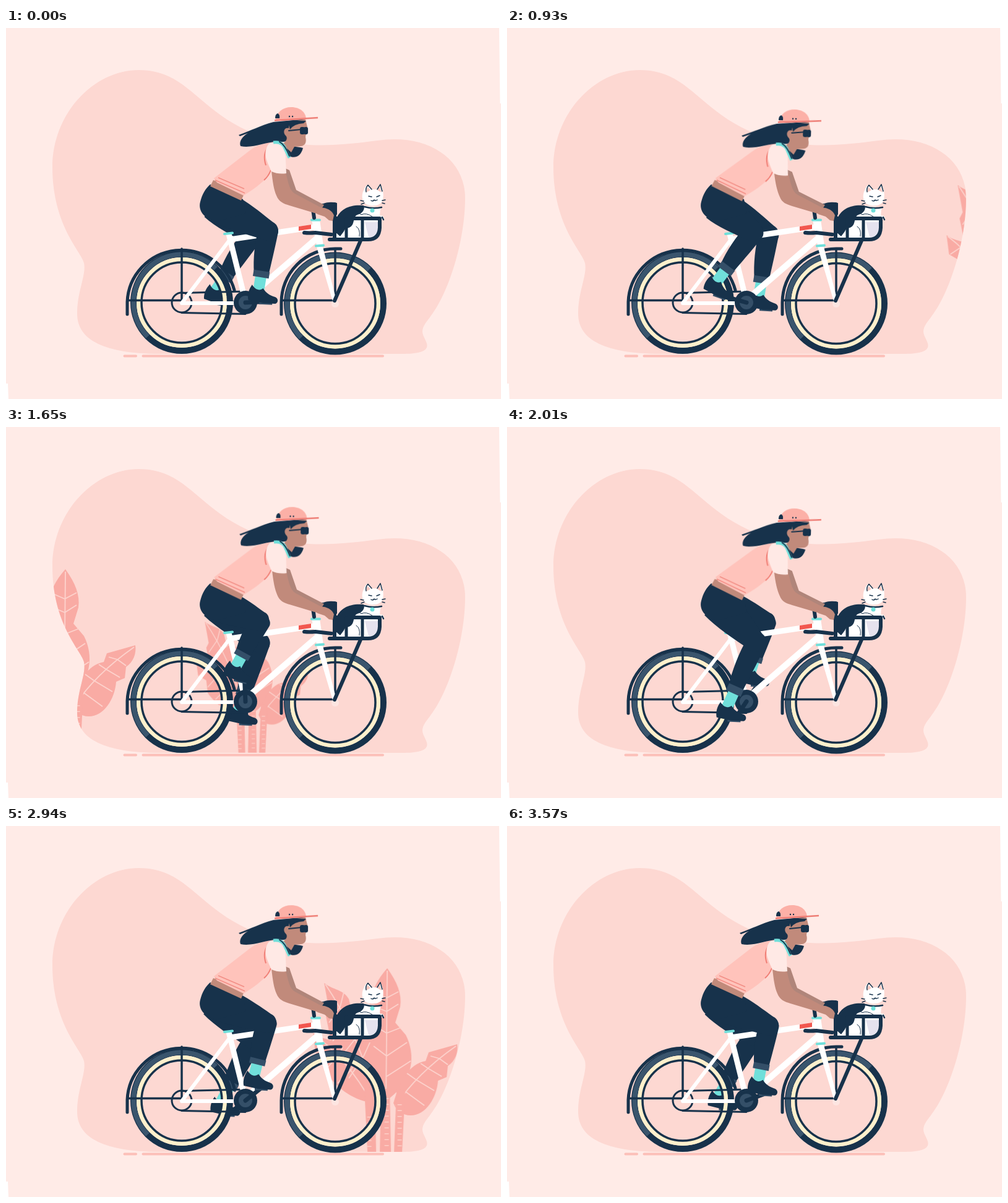
Recreate the animation shown at these times as an HTML page without scripts. Size 800 by 600 pixels, loop 3600 ms.

```html
<!DOCTYPE html>
<html lang="en">
<head>
<meta charset="utf-8">
<title>Bike ride</title>
<style>
@property --a { syntax: "<angle>"; inherits: true; initial-value: 0deg; }

html, body { margin: 0; width: 100%; height: 100%; overflow: hidden; background: #ffebe7; }
svg { display: block; width: 100vw; height: 100vh; }

.navy { fill: #17324b; }
.slate { fill: #344f68; }
.white { fill: #fff; }
.teal { fill: #70dfda; }
.skin { fill: #c18a7b; }
.shade { fill: #b0857a; }
.cap { fill: #fcb0a7; }
.line { fill: none; stroke: #17324b; stroke-linecap: round; stroke-linejoin: round; }
.tube { fill: none; stroke: #fff; }

/* Plants cross the scene in 900 ms, then wait off stage */
.plant { animation: pass 3600ms linear infinite; }
@keyframes pass {
  from { transform: translateX(520px); }
  25%, to { transform: translateX(-398px); }
}
.leaf { fill: #f9aba4; }
.vein { fill: none; stroke: #fdd3cd; stroke-width: 1.8; }

/* Legs: knee and ankle circle with the pedal, the limbs span between the joints */
.pedal { animation: pedal 600ms linear infinite; }
.far { animation-delay: -300ms; }
@keyframes pedal { from { --a: -3deg; } to { --a: 357deg; } }
.leg {
  --tilt: calc(3 + 25 * pow(max(0, cos(var(--a) - 225deg)), 3));
  --knee-x: calc(411 + 13 * cos(var(--a) + 5deg));
  --knee-y: calc(332 + 18 * sin(var(--a) - 10deg));
  --foot-x: calc(375 + 34 * cos(var(--a)) - .2 * var(--tilt));
  --foot-y: calc(426 + 34 * sin(var(--a)) - .3 * var(--tilt));
}
.thigh {
  --x: calc(var(--knee-x) - 338);
  --y: calc(var(--knee-y) - 285);
  transform: translate(338px, 285px) rotate(atan2(var(--y), var(--x))) scale(calc(hypot(var(--x), var(--y)) / 90), 1);
}
.shin {
  --x: calc(var(--foot-x) - var(--knee-x));
  --y: calc(var(--foot-y) - var(--knee-y));
  transform: translate(calc(var(--knee-x) * 1px), calc(var(--knee-y) * 1px)) rotate(atan2(var(--y), var(--x))) scale(calc(hypot(var(--x), var(--y)) / 102), 1);
}
.shoe { transform: translate(calc(var(--foot-x) * 1px), calc(var(--foot-y) * 1px)) rotate(calc(var(--tilt) * 1deg)); }
.crank { transform: translate(387px, 444px) rotate(var(--a)); }

/* Upper body bob */
.torso, .arm { animation: lean 300ms ease-in-out -25ms infinite alternate; }
.torso { transform-origin: 345px 270px; }
@keyframes lean { to { transform: rotate(2deg); } }
.near-arm { animation-name: near-arm; }
.far-arm { animation-name: far-arm; }
@keyframes near-arm {
  from { d: path("M429 231C431 250 433 262 437 271C441 281 448 284 458 287L508 302L514 293L467 268C458 263 456 250 452 233Z"); }
  to { d: path("M432 234C434 252 437 264 441 273C445 283 451 285 461 288L508 302L514 293L470 270C461 265 459 252 455 236Z"); }
}
@keyframes far-arm {
  from { d: path("M447 225L458 230L469 262L514 286L508 296L455 270Z"); }
  to { d: path("M450 228L461 233L472 265L514 286L508 296L458 272Z"); }
}
</style>
</head>
<body>
<svg viewBox="0 0 800 600">
<defs>
  <path id="blob" d="M215 68C290 68 310 130 390 166C460 199 540 190 600 182C680 170 742 210 742 275C742 345 715 430 685 468C665 492 675 495 680 510C684 524 665 527 640 527H250C150 527 115 500 115 462C115 425 130 400 126 380C122 362 75 320 75 225C75 140 140 68 215 68Z"/>
  <clipPath id="scene"><use href="#blob"/></clipPath>

  <g id="plant">
    <path class="leaf" d="M342 230C358 252 366 272 363 292L355 318L372 338C388 370 385 410 346 440H336C324 405 316 372 318 340L325 312L313 290C317 266 326 248 342 230Z"/>
    <path class="leaf" d="M455 353C457 366 452 380 440 388L438 406L424 412C422 440 404 468 380 468C366 468 356 460 352 448C362 414 376 385 404 380L409 366Z"/>
    <path class="leaf" d="M222 335C236 346 254 344 266 354L276 372L298 382C308 400 314 424 318 448C290 444 262 426 246 402L243 376L226 366Z"/>
    <path class="leaf" d="M240 254C256 266 271 264 280 280L284 297L313 310C316 335 336 390 334 432C300 428 272 410 262 388L252 352L243 308L248 298Z"/>
    <g class="vein">
      <path d="M242 256Q292 330 320 430M266 292L248 318M277 312L254 348M292 342L262 380M304 372L280 408M266 292L272 268M277 312L292 300M292 342L310 322M304 372L314 350"/>
      <path d="M224 337Q280 380 316 446M246 354L228 366M264 370L246 390M284 394L262 416M264 370L270 358M284 394L290 380"/>
      <path d="M342 234L340 440M341 278L318 268M341 300L322 292M341 335L320 322M341 372L320 356M341 278L360 268M341 300L360 288M341 335L364 326M341 372L374 350M341 405L380 380"/>
      <path d="M453 356Q390 400 356 452M426 376L412 372M408 392L396 384M388 410L374 400M426 376L440 386M408 392L430 405M388 410L418 428M372 430L402 452"/>
    </g>
    <path class="leaf" d="M305 425H322L324 527H310ZM332 425H346L348 527H330ZM357 425L371 428L366 527H353Z"/>
    <path d="M313 470V522M341 440V522M362 450V522" fill="none" stroke="#fdcfc8" stroke-width="7" stroke-dasharray="1.5 8"/>
  </g>

  <g id="leg">
    <g class="shin">
      <path class="teal" d="M78 -9H103L105 9H78Z"/>
      <path class="navy" d="M0 -16C30 -15 55 -13 74 -12V12C52 17 22 19 0 16A15 16 0 0 1 0 -16Z"/>
      <path class="slate" d="M69 -13H80V13H69Z"/>
    </g>
    <path class="thigh navy" d="M0 -27H30C52 -25 72 -20 90 -16A15 16 0 0 1 90 16C60 21 28 28 0 27Z"/>
    <g class="shoe">
      <path class="slate" d="M2 17H23V23H2Z"/>
      <path class="navy" d="M-11 -8C-16 0 -18 8 -16 17L8 21H28C33 19 33 12 27 10C18 8 12 4 7 -3C2 2 -6 0 -11 -8Z"/>
    </g>
  </g>

  <path id="crank" class="line" d="M0 0H34" stroke-width="7"/>

  <g id="wheel" fill="none">
    <circle r="78" stroke="#17324b" stroke-width="10"/>
    <path d="M-55 55A77 77 0 0 1 55 -55" stroke="#3a556d" stroke-width="8"/>
    <circle r="69.5" stroke="#fff0cc" stroke-width="7"/>
    <circle r="65" stroke="#17324b" stroke-width="3.500"/>
  </g>
</defs>

<path class="white" d="M797 0H800V122H798.500ZM0 575H3L4 600H0Z"/>
<use href="#blob" fill="#fdd8d2"/>
<g clip-path="url(#scene)">
  <use href="#plant" class="plant"/>
  <use href="#plant" class="plant" style="animation-delay:-2700ms"/>
  <use href="#plant" class="plant" style="animation-delay:-900ms"/>
  <g class="plant" style="animation-delay:-2400ms">
    <use href="#plant" transform="translate(75.100 118) scale(.776)"/>
  </g>
</g>
<path d="M191.500 530.500H210M221.500 530.500H609" stroke="#fcbfb8" stroke-width="4" stroke-linecap="round"/>

<g class="pedal far">
  <use href="#crank" class="crank"/>
  <use href="#leg" class="leg"/>
</g>

<!-- Bicycle -->
<use href="#wheel" x="284" y="444"/>
<use href="#wheel" x="532" y="445.500"/>
<g class="line">
  <path d="M196 463V443A88 87 0 0 1 369 424M445 463V444A87 87 0 0 1 532 357H541" stroke-width="5"/>
  <path d="M196 440.500H284V357M445 440.500H532V357" stroke-width="3.500"/>
  <circle cx="284" cy="444" r="16" stroke-width="3"/>
  <path d="M284 428.500L387 426M284 460.500L387 462.500" stroke-width="3"/>
</g>
<g class="tube">
  <path d="M284 445H370M284 445L362 342" stroke-width="6" stroke-linecap="round"/>
  <path d="M360 333L387 442M362 342L497 322" stroke-width="9"/>
  <path d="M506 337L396 432" stroke-width="10"/>
</g>
<path class="white" d="M494 310H507L513 352H502ZM502 354H512L535 445H529Z"/>
<path d="M473 321L493 318V325L473 328Z" fill="#f2574f"/>
<path d="M353 333L366 331.500M494 310.500H507M501 352.500L513 351.500" stroke="#70dfda" stroke-width="4" stroke-linecap="round"/>
<circle cx="532" cy="446" r="6" fill="#fde5e1"/>
<circle class="navy" cx="387" cy="444" r="19"/>
<circle class="slate" cx="387" cy="444" r="11"/>
<path class="line" d="M573 344L531 441" stroke-width="6"/>
<path class="line" d="M482 331Q490 332 500 331L526 334" stroke-width="6"/>

<!-- Cat -->
<path class="white" d="M534 339C533 308 548 288 576 287L606 291C602 300 607 316 603 330Q600 340 590 340Z"/>
<path d="M580 314H602C603 330 597 339 586 338Z" fill="#e5e2ee"/>
<path class="navy" d="M533 310C540 292 556 285 578 287C581 293 576 300 568 302C562 304 563 312 560 318C555 326 549 321 546 329L540 337L532 330Z"/>
<path class="white" d="M577 279C573 268 580 258 583 254L591 261H599L605 253C609 260 611 268 609 278C606 290 582 291 577 279Z"/>
<path d="M584 257L589 262L582 266ZM604 257L607 266L600 262Z" fill="#fcc8c0"/>
<path class="white" d="M572 302C580 297 590 300 595 306L590 311H570ZM598 306Q610 300 611 309L600 312Z"/>
<g class="line" stroke-width="1.500">
  <path d="M582 265C581 259 583 256 585 254L591 261M600 261L605 253L608 264M573 279L578 280M574 285L579 283M608 279L613 278M608 283L612 284"/>
  <path d="M586 272L591 273M599 273L604 271M590 279Q593 281 595 278Q597 280 600 278"/>
  <path d="M579 289Q593 293 607 290M608 306L610 310" stroke-width="2.500"/>
  <path d="M557 303Q570 296 574 302Q582 298 592 305M566 321Q573 325 571 337" stroke-width="1"/>
</g>
<circle class="teal" cx="592" cy="295" r="3.500"/>

<!-- Basket and handlebar -->
<g class="line" stroke-width="6">
  <path d="M531 285V341M527 308H604V323Q603 342 585 342H523"/>
  <path d="M550 309V340M576 309V340" stroke-width="5"/>
  <path d="M498 307L496 293Q499 287 509 287H531"/>
</g>
<path class="navy" d="M503 291C510 282 524 280 535 283V302L525 300Z"/>

<path class="arm far-arm shade" d="M447 225L458 230L469 262L514 286L508 296L455 270Z"/>

<!-- Near leg -->
<g class="pedal">
  <use href="#crank" class="crank"/>
  <use href="#leg" class="leg"/>
</g>
<path class="navy" d="M330 253L383 277L388 300L340 313C320 309 310 295 314 281C317 269 322 260 330 253Z"/>

<!-- Upper body -->
<path class="arm near-arm skin" d="M429 231C431 250 433 262 437 271C441 281 448 284 458 287L508 302L514 293L467 268C458 263 456 250 452 233Z"/>
<path class="skin" d="M504 291C515 289 527 294 530 303L528 312L522 311L515 305L503 301Z"/>
<g class="torso">
  <path class="skin" d="M335 246L386 266L380 279L330 256Z"/>
  <path d="M431 184C416 187 404 190 394 198L336 243L341 250L384 271C397 263 414 251 425 238L431 222Z" fill="#ffc3bb"/>
  <path d="M338 246L386 267M343 242L385 260" fill="none" stroke="#f28e85" stroke-width="1.500"/>
  <path d="M424 192Q414 204 420 222M428 230Q424 240 417 246" fill="none" stroke="#f07d74" stroke-width="2"/>
  <path d="M425 187C436 182 447 184 451 194L453 235Q440 237 429 232C423 218 413 202 425 187Z" fill="#ffe9e5"/>
  <path class="navy" d="M450 184C459 193 470 191 480 194C476 209 466 211 457 207Z"/>
  <path class="navy" d="M485 147L432 152C410 158 396 166 376 173L378 175L391 170C382 175 376 184 379 191C399 195 418 184 439 184C456 186 468 178 472 160Z"/>
  <path class="skin" d="M457 152L484 148L487 160L484 176C486 184 484 190 477 191L466 192L461 201L446 188C453 184 456 178 452 174C447 169 449 160 457 162Z"/>
  <path class="navy" d="M455 150H485L481 154Q465 155 459 164Z"/>
  <path d="M432 185Q447 183 451 195L458 210" fill="none" stroke="#70dfda" stroke-width="5"/>
  <path class="line" d="M442 184Q451 189 458 207" stroke-width="2"/>
  <path class="line" d="M457 166L477 164" stroke-width="2"/>
  <rect class="navy" x="475" y="160" width="8" height="12" rx="3"/>
  <rect class="navy" x="481" y="160" width="7" height="12" rx="3"/>
  <path class="cap" d="M435 150C437 136 447 128 461 128C476 128 485 137 485 148Z"/>
  <path class="navy" d="M435 146Q435 139 439 138Q443 140 442 146Z"/>
  <path d="M434 149.500L504 145" stroke="#ee7d75" stroke-width="2.500" fill="none"/>
  <circle class="navy" cx="458" cy="143" r="1.200"/>
  <circle class="navy" cx="463" cy="143" r="1.200"/>
</g>
</svg>
</body>
</html>
```
